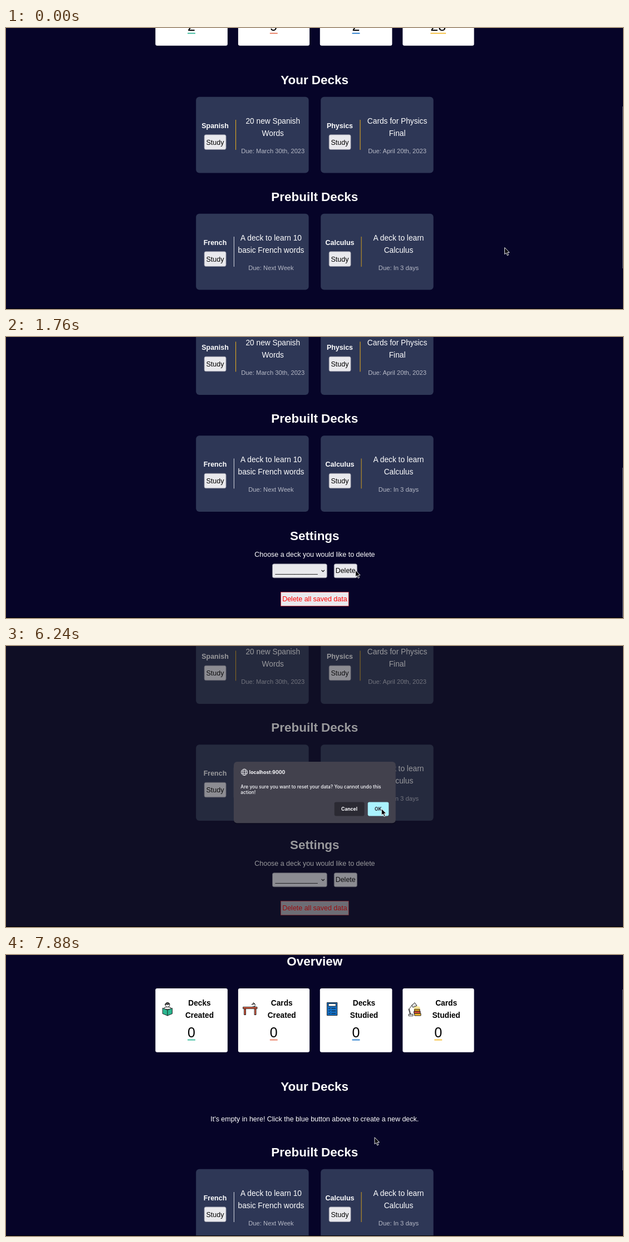
Animation of 1108 by 505 pixels, one loop 8 s. Source, as an HTML page:

```html
<!DOCTYPE html>
<html lang="en">
<head>
<meta charset="utf-8">
<title>Flashcard decks</title>
<style>
  html, body { margin: 0; width: 100%; height: 100%; overflow: hidden; background: #060428; }
  svg { display: block; width: 100vw; height: 100vh; }
  text { font: 12.48px "Liberation Sans", Arial, sans-serif; fill: #fff; text-anchor: middle; }
  .head { font-size: 22.46px; font-weight: bold; }
  .bold { font-weight: bold; }
  .desc { font-size: 13.73px; }
  .due { font-size: 11.23px; fill: #b6b9c6; }
  .stat { font-size: 13.73px; font-weight: bold; fill: #000; }
  .num { font-size: 24.96px; fill: #000; }
  .dark { fill: #000; }
  .left { text-anchor: start; }
  .btn { fill: #e9e9ed; stroke: #8f8f9d; stroke-width: .8; }
  .ink { stroke: #111; stroke-width: .9; stroke-linejoin: round; stroke-linecap: round; }
  #dialog text { font: 700 8.5px Inter, "Open Sans", sans-serif; fill: #fbfbfe; }
  #dialog .host { font-size: 8.6px; }
  #dialog .msg { font-size: 8.35px; font-weight: 500; }
</style>
</head>
<body>
<svg id="stage" viewBox="0 0 1108 505" preserveAspectRatio="none"></svg>
<script>
const LOOP = 8000;
const SHRINK = 92;      // height lost when the user's decks are removed
const RESET = 6380;

const text = (x, y, str, cls = "") => `<text x="${x}" y="${y}" class="${cls}">${str}</text>`;
const rect = (x, y, w, h, attrs = "") => `<rect x="${x}" y="${y}" width="${w}" height="${h}" ${attrs}/>`;
const path = (d, fill = "none") => `<path class="ink" d="${d}" fill="${fill}"/>`;

function deck(x, y, name, lineX, lineColor, midX, lines, due) {
  const mid = x + 34.3;
  return rect(x, y, 202.4, 136.8, 'rx="6" fill="#2e3756"')
    + text(mid, y + 55.7, name, "bold")
    + rect(mid - 19.4, y + 68, 39, 26.6, 'rx="2.8" class="btn"')
    + text(mid, y + 85.7, "Study", "dark")
    + rect(lineX, y + 41.2, 1.1, 54, `fill="${lineColor}"`)
    + lines.map((s, i) => text(midX, y + 47.8 + i * 22, s, "desc")).join("")
    + text(midX, y + 101.2, due, "due");
}

const icons = [
  path("M3 12V9.500Q9 7 15 9.500V12Z", "#fff")
    + path("M5 4.500A4 4 0 1 1 13 4.500A4 4 0 1 1 5 4.500Z", "#fff")
    + path("M5 3.500Q9 5 13 3.500Q12 .5 9 .5Q6 .5 5 3.500Z", "#555")
    + path("M.5 10.500L9 14L17.500 10.500V20.500L9 24L.5 20.500Z", "#2bb58f")
    + path("M9 14V24"),
  path("M2 11H4.500V22.500H2ZM20.500 11H23V22.500H20.500Z", "#d9553a")
    + path("M0 8.500H25V11.500H0Z", "#e8674a")
    + path("M17 8H22M19.500 8L22 4.500L18 1.500M15.500 4L18.500 .7L20.500 2.500Z", "#fff"),
  path("M.5 .5H18.500V23.500H.5Z", "#1270c8")
    + path("M3 2.500H16V7H3Z", "#fff")
    + path("M3 10.800L4.200 12L6 10M8.500 11H15.500M3 15.300L4.200 16.500L6 14.500M8.500 15.500H15.500M3 19.800L4.200 21L6 19M8.500 20H15.500"),
  '<path d="M12 6L21 8L22 14H10Z" fill="#ffe79a"/>'
    + path("M1 24V21.500H9V24ZM5 21.500L2 12L8 4M3.500 21.500L1 12")
    + path("M7 5L12 .7L16 6L9 9Z", "#ddd")
    + path("M12 12.500H21V16H12Z", "#f4b92a")
    + path("M11 16H22V20H11Z", "#e0533d")
    + path("M12 20H23V24H12Z", "#f4b92a")
];

const stats = [
  { x: 268.3, w: 129.6, mid: 347.5, num: 333, icon: 281, words: ["Decks", "Created"], count: 2, color: "#2ab594" },
  { x: 416.9, w: 128.2, mid: 495.2, num: 480.8, icon: 426, words: ["Cards", "Created"], count: 9, color: "#e76f51" },
  { x: 563.8, w: 129.6, mid: 643, num: 628.5, icon: 576.3, words: ["Decks", "Studied"], count: 2, color: "#1270c8" },
  { x: 712.3, w: 128.2, mid: 790.6, num: 776.2, icon: 722, words: ["Cards", "Studied"], count: 28, color: "#f4b92a" }
];

const statCard = (s, i) => rect(s.x, 60, s.w, 114.8, 'rx="3.2" fill="#fff"')
  + `<g transform="translate(${s.icon} 85)">${icons[i]}</g>`
  + text(s.mid, 91, s.words[0], "stat") + text(s.mid, 113, s.words[1], "stat")
  + `<text class="num" x="${s.num}" y="148"></text><rect class="rule" y="151.700" height="1.700" fill="${s.color}"/>`;

const gold = "#dba622";
const userDecks =
  deck(341.2, 266.8, "Spanish", 412, gold, 479.3, ["20 new Spanish", "Words"], "Due: March 30th, 2023")
  + deck(565.2, 266.8, "Physics", 635.5, gold, 702.6, ["Cards for Physics", "Final"], "Due: April 20th, 2023");

const lower = text(554.3, 454, "Prebuilt Decks", "head")
  + deck(341.2, 476.8, "French", 408.9, "#c8cbd6", 476, ["A deck to learn 10", "basic French words"], "Due: Next Week")
  + deck(565.2, 476.8, "Calculus", 637.6, "#c39524", 705, ["A deck to learn", "Calculus"], "Due: In 3 days")
  + text(554.3, 664.5, "Settings", "head")
  + text(554.4, 695, "Choose a deck you would like to delete")
  + rect(478.5, 707.4, 97.8, 25, 'rx="2.800" class="btn" id="select"')
  + text(483.4, 723.8, "_".repeat(11), "dark left")
  + '<path d="M566.600 718.600L569.200 721.200L571.800 718.600" fill="none" stroke="#111" stroke-width="1.100"/>'
  + rect(589.2, 707.4, 41.2, 25, 'rx="2.800" class="btn" id="del"')
  + text(609.7, 724, "Delete", "dark")
  + rect(493.6, 758.1, 121.6, 25, 'id="wipe" fill="#e9e9ed" stroke="#d8323a" stroke-width=".8"')
  + '<text x="554.400" y="775.100" style="fill:#f00">Delete all saved data</text>';

const dialog = rect(409, 209, 291, 111, 'rx="6" fill="#000" opacity=".2"')
  + rect(409, 208, 290.8, 110.3, 'rx="6" fill="#42414d"')
  + '<g fill="none" stroke="#fbfbfe" stroke-width=".9"><circle cx="428" cy="226.800" r="5.600"/>'
  + '<ellipse cx="428" cy="226.800" rx="2.500" ry="5.600"/><path d="M422.800 225H433.200M422.800 228.700H433.200"/></g>'
  + text(436.8, 229.7, "localhost:9000", "host left")
  + text(421.3, 255.6, "Are you sure you want to reset your data? You cannot undo this", "msg left")
  + text(421.3, 266.1, "action!", "msg left")
  + rect(589.7, 280.4, 53.8, 25, 'rx="2.800" fill="#2b2a33"') + text(616.5, 296.4, "Cancel")
  + rect(649.7, 280.4, 37.6, 25, 'rx="2.800" id="ok"')
  + '<text x="668.400" y="296.400" style="fill:#2b2a33">OK</text>';

const stage = document.getElementById("stage");
stage.innerHTML = rect(0, 0, 1108, 505, 'fill="#060428"')
  + '<g id="page">' + text(554.3, 18.8, "Overview", "head") + stats.map(statCard).join("")
  + text(554.1, 244, "Your Decks", "head")
  + `<g id="mine">${userDecks}</g><g id="empty">`
  + text(554.3, 299.2, "It's empty in here! Click the blue button above to create a new deck.")
  + `</g><g id="lower">${lower}</g></g>`
  + '<rect id="thumb" x="1107" width="1" fill="#6b697c"/>'
  + `<g id="modal">${rect(0, 0, 1108, 505, 'fill="#1c1b22" opacity=".45"')}<g id="dialog">${dialog}</g></g>`
  + rect(0, 504, 1108, 1, 'fill="#000"')
  + '<path id="cursor" d="M0 0V12L2.800 9.500L4.800 14.200L6.900 13.300L4.900 8.800H8.500Z" fill="#08080c" stroke="#fff" stroke-width=".9" stroke-linejoin="round"/>';

const $ = id => document.getElementById(id);
const nums = [...stage.querySelectorAll(".num")];
const rules = [...stage.querySelectorAll(".rule")];

// Each row: start time, value held until the next row.
const scroll = [[0, 143], [150, 172], [300, 184], [590, 232], [740, 288], [880, 303.3], [1030, 302.2], [1180, 301],
  [1320, 300.2], [1470, 299.8], [1620, 299.6], [RESET, 207.6], [7430, 164], [7580, 96.3], [7730, 36], [7880, 0]];
const pointer = [[0, [895.5, 394.6]], [1320, [868, 398]], [1470, [770, 410]], [1620, [668, 418]], [1760, [627.6, 419.2]],
  [1910, [606, 418]], [2060, [574, 418]], [2210, [562, 420]], [2360, [556, 421]], [2800, [552, 444]],
  [2950, [549.3, 462.4]], [3250, [549.5, 463.2]], [4150, [581.6, 412.5]], [4600, [584.6, 404.8]], [5200, [600, 376]],
  [5350, [628, 338]], [5490, [652, 308]], [5640, [668, 296]], [5790, [674.3, 292.3]], [6830, [668, 312]], [6980, [662, 327.8]]];
const bar = [[0, 1], [2060, .5], [2210, 0], [RESET, 1], [6830, .5], [6980, 0], [7430, 1]];
const modal = [[0, 0], [3700, .5], [3850, 1], [RESET, 0]];
const idle = "#e9e9ed", hover = "#d0d0d7", active = "#b1b1b9";
const fills = {
  del: [[0, idle], [1910, hover], [2060, idle]],
  select: [[0, idle], [2060, hover], [2800, idle]],
  wipe: [[0, idle], [2950, hover], [3700, active], [RESET, idle]],
  ok: [[0, "#00ddff"], [5640, "#80ebff"], [6240, "#aaf2ff"]]
};

const at = (rows, t) => rows.reduce((v, row) => t >= row[0] ? row[1] : v, rows[0][1]);
let wasCleared = null;

function setCleared(cleared) {
  if (cleared === wasCleared) return;
  wasCleared = cleared;
  $("mine").style.display = cleared ? "none" : "";
  $("empty").style.display = cleared ? "" : "none";
  $("lower").setAttribute("transform", `translate(0 ${cleared ? -SHRINK : 0})`);
  $("thumb").setAttribute("height", cleared ? 325 : 291);
  stats.forEach((s, i) => {
    const n = String(cleared ? 0 : s.count), w = n.length * 13.88;
    nums[i].textContent = n;
    rules[i].setAttribute("x", s.num - w / 2);
    rules[i].setAttribute("width", w);
  });
}

function draw(t) {
  const cleared = t >= RESET, y = at(scroll, t), [px, py] = at(pointer, t);
  setCleared(cleared);
  $("page").setAttribute("transform", `translate(0 ${-y})`);
  $("thumb").setAttribute("y", cleared ? 62 + y * .656 : 141 + (y - 143) * .6);
  $("thumb").setAttribute("opacity", at(bar, t));
  $("modal").setAttribute("opacity", at(modal, t));
  $("cursor").setAttribute("transform", `translate(${px} ${py})`);
  for (const id in fills) $(id).style.fill = at(fills[id], t);
}

const start = performance.now();
function tick() {
  draw((performance.now() - start) % LOOP);
  requestAnimationFrame(tick);
}
tick();
</script>
</body>
</html>
```
